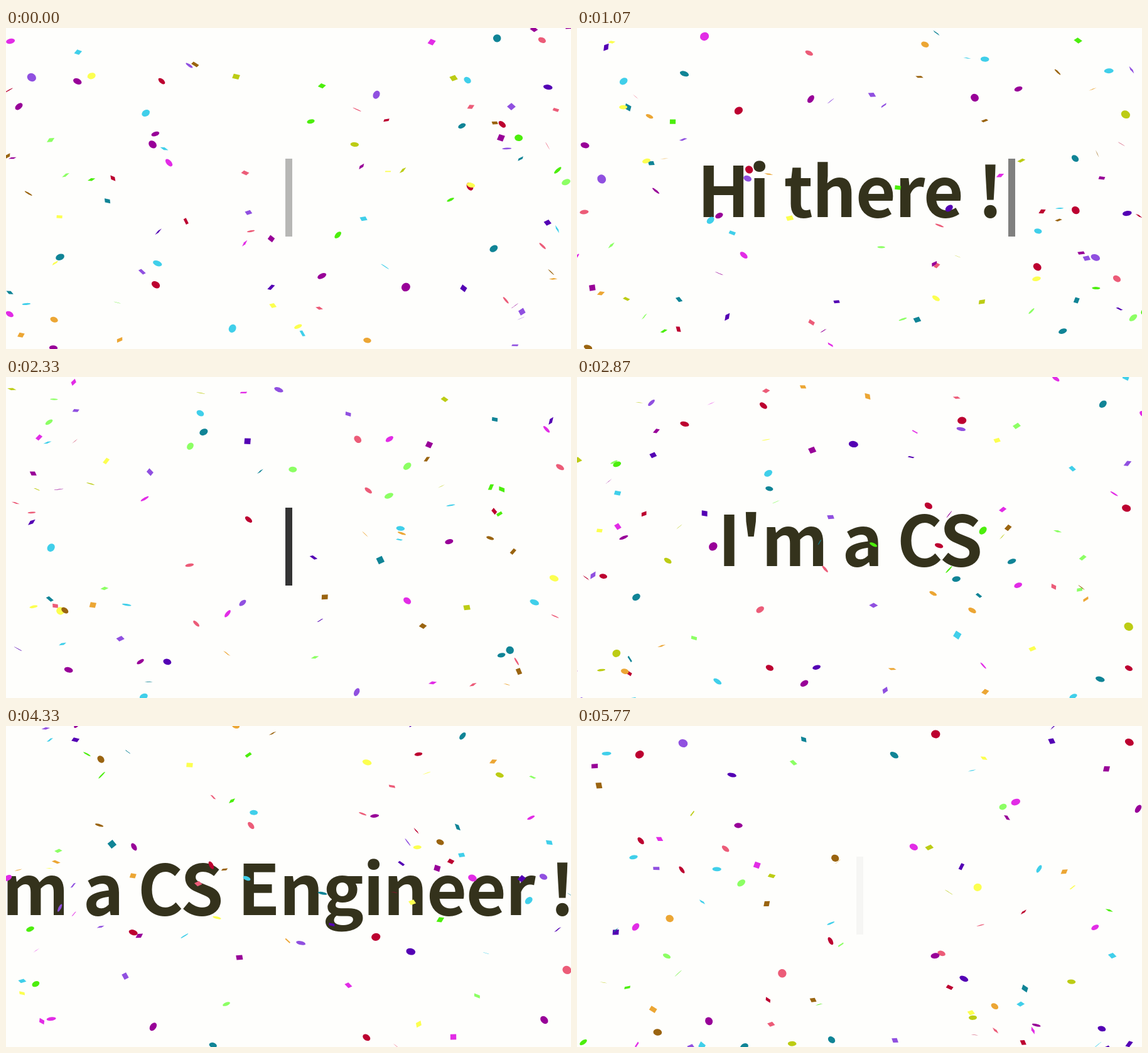
An HTML page with a canvas that plays this animation: 900x511 px, repeating every 5.8 s.

```html
<!DOCTYPE html>
<html lang="en">
<head>
<meta charset="utf-8">
<title>Greeting with confetti</title>
<style>
  html, body { margin: 0; width: 100%; height: 100%; overflow: hidden; background: #fefefc; }
  .stage { position: relative; width: 900px; height: 511px; overflow: hidden; }
  /* Wider than the stage so that long text overflows evenly on both sides */
  .line {
    position: absolute; top: 0; left: -550px; width: 2000px;
    text-align: center; white-space: pre; line-height: 0; color: #34321c;
    font: bold 110.5px/0 "Noto Sans CJK JP", "Noto Sans CJK SC", "Noto Sans CJK", "Noto Sans", sans-serif;
    letter-spacing: -1.5px;
  }
  /* Strut that puts the baseline at 301px */
  .line::before { content: ""; display: inline-block; height: 301px; }
  .cursor {
    display: inline-block; width: 11px; height: 124px; margin: 0 10px;
    vertical-align: -31px; background: #333;
    animation: blink 1s ease infinite paused;
  }
  @keyframes blink { 0%, 100% { opacity: 0; } 50% { opacity: 1; } }
  canvas { position: absolute; top: 0; left: 0; }
</style>
</head>
<body>
<div class="stage">
  <div class="line"><span id="text"></span><span class="cursor" id="cursor"></span></div>
  <canvas id="confetti" width="900" height="511"></canvas>
</div>
<script>
const LOOP = 5800, W = 900, H = 511, PAD = 20;
const text = document.getElementById('text');
const cursor = document.getElementById('cursor');
const ctx = document.getElementById('confetti').getContext('2d');

const lines = [
  { words: 'Hi there !', type: 180, typeStep: 67, erase: 1600 },
  { words: "I'm a CS Engineer !!", type: 2290, typeStep: 68, erase: 4430 }
];
const ERASE_STEP = 62;

// Front and back colour of each kind of paper
const papers = [
  ['#fcff50', '#bccc14'], ['#8cff64', '#4cee0c'], ['#eca634', '#9a6410'],
  ['#ec5c78', '#bc0030'], ['#40cfea', '#108496'], ['#9050e0', '#5400b4'],
  ['#e22ce6', '#980098']
];

let seed = 2024;
function random() {
  seed = (seed * 1664525 + 1013904223) >>> 0;
  return seed / 4294967296;
}
const between = (a, b) => a + (b - a) * random();

const pieces = Array.from({ length: 108 }, () => ({
  x: between(-1, 1),
  y: between(0, H + 2 * PAD),
  fall: between(120, 230),
  drift: between(-25, 25),
  sway: between(4, 14),
  swayRate: between(2, 5),
  phase: between(0, 2 * Math.PI),
  tilt: between(-0.9, 0.9),
  spin: between(0, 2 * Math.PI),
  spinRate: between(-2, 2),
  roll: between(0, 2 * Math.PI),
  rollRate: between(4, 9),
  flat: between(0.5, 1),
  size: between(0.85, 1.05),
  round: random() < 0.48,
  paper: papers[Math.floor(random() * papers.length)]
}));

// Spread across the width, denser towards the sides
function startX(x, pass) {
  const u = ((x + 1 + pass * 1.236) % 2) - 1;
  return W / 2 * (1 + Math.sign(u) * Math.abs(u) ** 0.7);
}

function drawPiece(p, s) {
  const span = H + 2 * PAD;
  const fallen = p.y + p.fall * s;
  const pass = Math.floor(fallen / span);
  const y = fallen % span - PAD;
  const x = startX(p.x, pass) + p.drift * s + p.sway * Math.sin(p.phase + p.swayRate * s);
  const face = Math.cos(p.roll + p.rollRate * s);

  ctx.save();
  ctx.translate(x, y);
  ctx.rotate(p.tilt + 0.25 * Math.sin(p.phase + p.swayRate * s));
  ctx.scale(p.size, p.size * p.flat * Math.max(Math.abs(face), 0.06));
  ctx.rotate(p.spin + p.spinRate * s);
  ctx.fillStyle = p.paper[face > 0 ? 0 : 1];
  ctx.beginPath();
  if (p.round) ctx.arc(0, 0, 7.2, 0, 2 * Math.PI);
  else ctx.rect(-5, -5, 10, 10);
  ctx.fill();
  ctx.restore();
}

function typed(t) {
  const line = t < lines[1].type ? lines[0] : lines[1];
  const full = line.words.length;
  const added = Math.min(full, Math.max(0, Math.floor((t - line.type) / line.typeStep)));
  const erased = Math.max(0, Math.floor((t - line.erase) / ERASE_STEP));
  return line.words.slice(0, Math.max(0, added - erased));
}

function draw() {
  // The picture advances 30 times a second
  const step = Math.floor((performance.now() % LOOP + 6.7) * 0.03);
  const t = step / 0.03;
  const words = typed(t);
  if (text.textContent !== words) text.textContent = words;
  cursor.style.animationDelay = -(t + 112) + 'ms';
  ctx.clearRect(0, 0, W, H);
  for (const p of pieces) drawPiece(p, t / 1000);
  requestAnimationFrame(draw);
}
draw();
</script>
</body>
</html>
```
